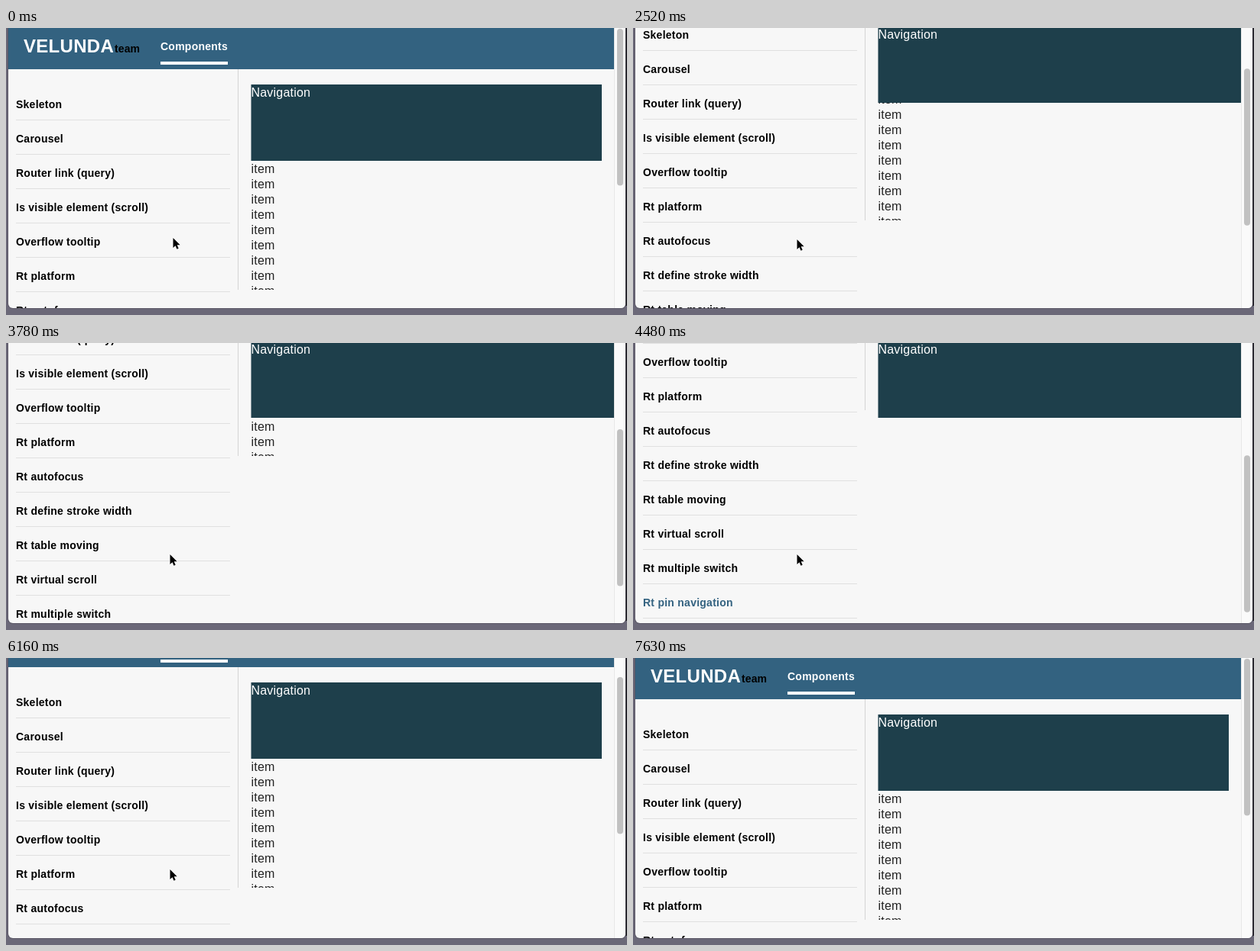
Recreate the animation shown at these times as an HTML page with a canvas. Size 812 by 376 pixels, loop 8.68 s.

```html
<!DOCTYPE html>
<html lang="en">
<head>
<meta charset="utf-8">
<title>Pin navigation</title>
<style>
html, body { margin: 0; width: 100%; height: 100%; overflow: hidden; background: #6b6878; }
canvas { display: block; width: 812px; height: 376px; }
</style>
</head>
<body>
<canvas id="stage"></canvas>
<script>
const W = 812, H = 376, LOOP = 8680, STEP = 70;
const SANS = '"Liberation Sans", Arial, Helvetica, sans-serif';
const BLUE = '#336280', DARK = '#1e3f4b', PAGE = '#f7f7f7';
const MENU = ['Skeleton', 'Carousel', 'Router link (query)', 'Is visible element (scroll)',
  'Overflow tooltip', 'Rt platform', 'Rt autofocus', 'Rt define stroke width',
  'Rt table moving', 'Rt virtual scroll', 'Rt multiple switch', 'Rt pin navigation'];

const linear = u => u;
const easeOut = u => 1 - (1 - u) ** 3;
const easeInOut = u => u < 0.5 ? 4 * u ** 3 : 1 - 4 * (1 - u) ** 3;
const smooth = u => u * u * (3 - 2 * u);

// Scroll gestures; each starts where the one before it ended
const FLICKS = [
  { start: 0, end: 1260, to: 52, ease: easeOut },
  { start: 1820, end: 2520, to: 91, ease: easeOut },
  { start: 2660, end: 3780, to: 195, ease: smooth },
  { start: 4130, end: 4480, to: 255, ease: smooth },
  { start: 5250, end: 5390, to: 270, ease: linear },
  { start: 5810, end: 6160, to: 42, ease: easeInOut },
  { start: 6440, end: 6860, to: 0, ease: linear }
];

const canvas = document.getElementById('stage');
const ctx = canvas.getContext('2d');
const dpr = window.devicePixelRatio || 1;
canvas.width = W * dpr;
canvas.height = H * dpr;

const progress = (t, start, end) => Math.min(1, Math.max(0, (t - start) / (end - start)));
const mix = (a, b, u) => a + (b - a) * u;

function scrollAt(t) {
  let s = 0;
  for (const f of FLICKS) s = mix(s, f.to, f.ease(progress(t, f.start, f.end)));
  return Math.round(s);
}

function box(x, y, w, h, color) {
  ctx.fillStyle = color;
  ctx.fillRect(x, y, w, h);
}

function pill(x, y, w, h, r, color) {
  ctx.fillStyle = color;
  ctx.beginPath();
  ctx.roundRect(x, y, w, h, r);
  ctx.fill();
}

function text(str, x, y, size, color, bold, gap = 0.25) {
  ctx.font = (bold ? 'bold ' : '') + size + 'px ' + SANS;
  ctx.letterSpacing = gap + 'px';
  ctx.fillStyle = color;
  ctx.fillText(str, x, y);
}

function header(s) {
  box(3, -s, 792, 54, BLUE);
  text('VELUNDA', 23, 32 - s, 24, '#fff', true, 0.3);
  text('team', 142, 32 - s, 14, '#000', true, 0.1);
  text('Components', 202, 29 - s, 14, '#fff', true);
  box(202, 44 - s, 88, 4, '#fff');
}

function menu(s) {
  MENU.forEach((name, i) => {
    const y = 105 + i * 45 - s;
    const last = i === MENU.length - 1;
    text(name, 13, y, 14, last ? BLUE : '#000', true);
    box(13, y + 15, 280, 1, '#e0e0e0');
  });
}

function content(s) {
  box(303, 54 - s, 1, 289, '#d4d4d4');
  ctx.save();
  ctx.beginPath();
  ctx.rect(304, 54 - s, 491, 289);
  ctx.clip();
  for (let i = 0; i < 9; i++) text('item', 320.5, 190 + i * 20 - s, 16, '#222', false, 0.2);
  ctx.restore();

  const pinned = s > 74;
  const top = pinned ? -2 : 74 - s;
  const right = pinned ? 795 : 779;
  box(320.5, top, right - 320.5, 100, DARK);
  text('Navigation', 320.5, top + 16, 16, '#fff', false, 0.2);
}

function scrollbar(s) {
  box(795, 0, 15, 367, '#fafafa');
  box(795, 0, 1, 367, '#e8e8e8');
  pill(799, 1 + s * 0.574, 8, 205.5, 4, '#c1c1c1');
}

function arrow(x, y) {
  ctx.beginPath();
  [[0, 0], [0, 13], [3, 10.2], [5, 14.8], [7.2, 13.8], [5.2, 9.3], [9.2, 9.3]]
    .forEach(([dx, dy]) => ctx.lineTo(x + dx, y + dy));
  ctx.closePath();
  ctx.lineJoin = 'round';
  ctx.lineWidth = 1.6;
  ctx.strokeStyle = '#fff';
  ctx.stroke();
  ctx.fillStyle = '#000';
  ctx.fill();
}

// A slow drift while scrolling, then a quick way out past the header
function pointer(t) {
  if (t >= 7420) return;
  const drift = easeOut(progress(t, 0, 2520));
  const leave = smooth(progress(t, 7070, 7350));
  const x = mix(mix(218.5, 214.5, drift), 228, leave);
  const y = mix(mix(275, 277, drift), 27, leave);
  arrow(x, y);
}

function draw(t) {
  const s = scrollAt(t);
  ctx.setTransform(dpr, 0, 0, dpr, 0, 0);
  box(0, 0, W, H, '#6b6878');
  pill(2, -10, 809, 378, 7, '#5a5766');
  box(810, 0, 2, 364, '#2b2a31');

  ctx.save();
  ctx.beginPath();
  ctx.roundRect(3, -10, 807, 377, 6);
  ctx.clip();
  box(3, 0, 807, 367, PAGE);
  header(s);
  menu(s);
  content(s);
  scrollbar(s);
  ctx.restore();

  pointer(t);
}

const start = performance.now();
function tick() {
  const t = (performance.now() - start) % LOOP;
  draw(Math.floor(t / STEP) * STEP);
  requestAnimationFrame(tick);
}
tick();
</script>
</body>
</html>
```
